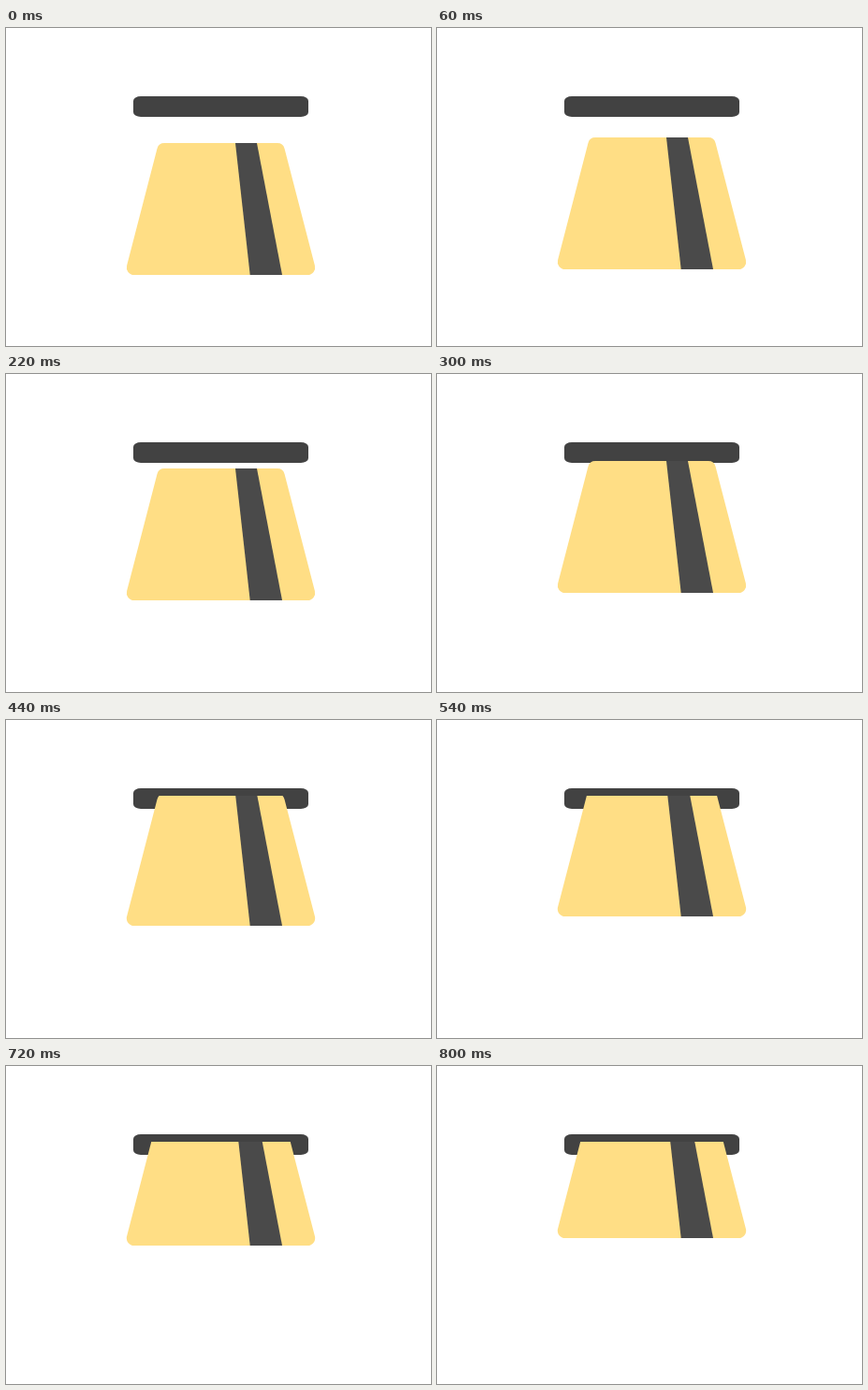
These frames come from a looping animation (454x340 px, 1900 ms). An HTML page with a canvas:

```html
<!DOCTYPE html>
<html lang="en">
<head>
<meta charset="utf-8">
<title>Card into slot</title>
<style>
  html, body { margin: 0; width: 100%; height: 100%; overflow: hidden; background: #fff; }
  canvas { display: block; width: 454px; height: 340px; }
</style>
</head>
<body>
<canvas id="stage" width="454" height="340"></canvas>
<script>
const ctx = document.getElementById('stage').getContext('2d');
const LOOP = 1900, STEP = 20, STEPS = 40, RISE = 2;
const SLIT = 81, CARD_TOP = 123, CARD_H = 141;

function drawSlot() {
  ctx.fillStyle = '#424242';
  ctx.beginPath();
  ctx.roundRect(136, 73, 187, 22, [{ x: 8, y: 5 }]);
  ctx.fill();
}

function cardPath(top, bottom) {
  ctx.beginPath();
  ctx.moveTo(229.5, top);
  ctx.arcTo(296, top, 332.5, bottom, 8);
  ctx.arcTo(332.5, bottom, 126.5, bottom, 8);
  ctx.arcTo(126.5, bottom, 163, top, 8);
  ctx.arcTo(163, top, 229.5, top, 8);
  ctx.closePath();
}

function drawCard(top) {
  const bottom = top + CARD_H;
  ctx.save();
  // Everything above the slit is already inside the slot.
  ctx.beginPath();
  ctx.rect(0, SLIT, 454, 340 - SLIT);
  ctx.clip();

  cardPath(top, bottom);
  ctx.fillStyle = '#ffde85';
  ctx.fill();

  ctx.beginPath();
  ctx.moveTo(245, top);
  ctx.lineTo(268, top);
  ctx.lineTo(295, bottom);
  ctx.lineTo(260.7, bottom);
  ctx.closePath();
  ctx.fillStyle = '#4a4a4a';
  ctx.fill();
  ctx.restore();
}

function draw(time) {
  const step = Math.min(STEPS, Math.floor((time % LOOP) / STEP));
  ctx.fillStyle = '#fff';
  ctx.fillRect(0, 0, 454, 340);
  drawSlot();
  drawCard(CARD_TOP - step * RISE);
}

const start = performance.now();
function tick() {
  draw(performance.now() - start);
  requestAnimationFrame(tick);
}
tick();
</script>
</body>
</html>
```
